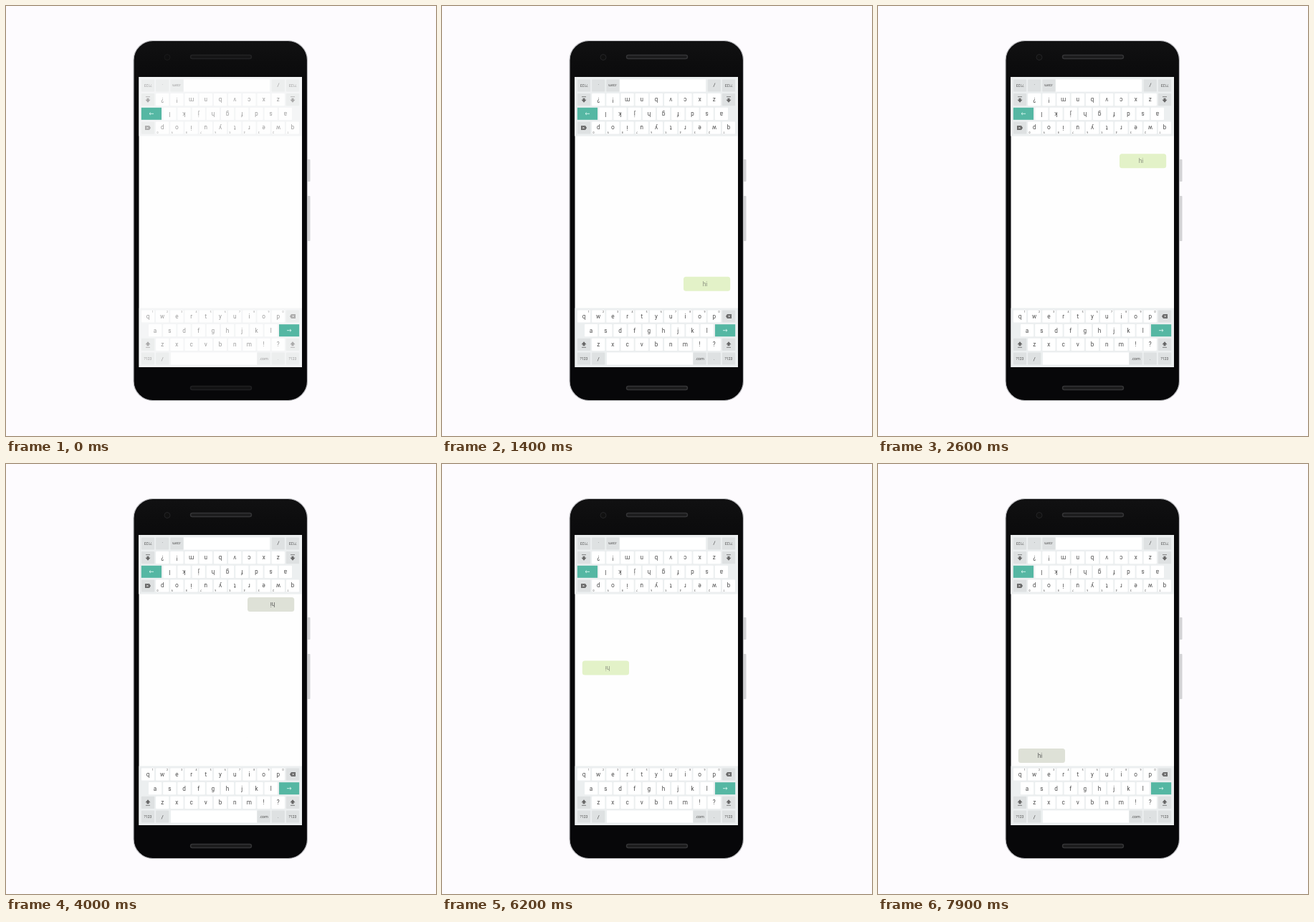
An HTML page for the animation above (8 s loop, 600 px wide and 600 px high).

```html
<!DOCTYPE html>
<html lang="en">
<head>
<meta charset="utf-8">
<style>
  html, body { margin: 0; width: 100%; height: 100%; overflow: hidden; background: #fdfbfe; }
  svg { display: block; width: 100%; height: 100%; }
  text { font-family: Roboto, "Open Sans", sans-serif; text-anchor: middle; fill: #4c4c4c; }
</style>
</head>
<body>
<svg id="stage" viewBox="0 0 600 600"></svg>
<script>
const LOOP = 8000, PITCH = 20.2, LEFT = 198;
const ROWS = [433, 452.7, 472.3, 492];
const col = i => LEFT + i * PITCH;

const rect = (x, y, w, h, fill, extra = '') =>
  `<rect x="${x}" y="${y}" width="${w}" height="${h}" fill="${fill}" ${extra}/>`;
const label = (s, x, y, size, extra = '') =>
  `<text x="${x}" y="${y}" font-size="${size}" ${extra}>${s}</text>`;
const key = (x, row, fill = '#fff', w = 18.2) =>
  rect(x - w / 2, ROWS[row] - 8.6, w, 17.2, fill, 'rx="1"');
const press = (name, x, row) =>
  `<g class="${name}" opacity="0">${key(x, row, '#a6a6a6')}</g>`;

function letters(chars, row, first) {
  return [...chars].map((c, i) => {
    const x = col(first + i);
    const digit = row ? '' : label((i + 1) % 10, x + 6.8, ROWS[0] - 4.6, 3.6);
    return key(x, row) + label(c, x, ROWS[row] + 2.8, 8.2) + digit;
  }).join('');
}

function modifier(i, row, content) {
  return key(col(i), row, '#dee1e2') +
    `<g transform="translate(${col(i)} ${ROWS[row]})">${content}</g>`;
}

function keyboard() {
  const shift = '<path d="M0-4L3.5 0H1.5V2H-1.5V0H-3.5Z" fill="#666"/>' +
    rect(-3, 3.6, 6, .9, '#777');
  const erase = '<path d="M-4 0L-2-3H4V3H-2Z" fill="#666"/>' +
    '<path d="M-.7-1.4L2 1.4M2-1.4L-.7 1.4" stroke="#eee" stroke-width=".8"/>';
  const symbols = label('?123', 0, 1.8, 5);
  return rect(185.5, 421.5, 227.5, 82.5, '#eceff0') +
    letters('qwertyuiop', 0, 0) + modifier(10, 0, erase) +
    letters('asdfghjkl', 1, .5) +
    modifier(0, 2, shift) + letters('zxcvbnm!?', 2, 1) + modifier(10, 2, shift) +
    modifier(0, 3, symbols) + modifier(1, 3, label('/', 0, 2.8, 8)) +
    rect(230, 483.4, 120, 17.2, '#fff') +
    modifier(8, 3, label('.com', 0, 2, 5.5)) + modifier(9, 3, label('.', 0, 2, 6)) +
    modifier(10, 3, symbols);
}

// One player's half; the other is the same half turned by 180 degrees.
function side(id, turn) {
  const word = (name, angle) =>
    `<g class="${name}" transform="rotate(${angle} 32.5 10)">${label('hi', 30, 13, 8.2)}</g>`;
  return `<g id="${id}" transform="rotate(${turn} 299 301.5)">
    <g class="intro">${keyboard()}</g>
    ${rect(381, 444.2, 28.2, 17, '#55b7a3', 'class="enter"')}
    <path d="M392 452.7H398M396.2 451L398 452.7L396.2 454.4" fill="none" stroke="#e9fffa" stroke-width=".8"/>
    ${press('h', col(5.5), 1)}${press('i', col(7), 0)}
    <g class="bubble">${rect(0, 0, 65.2, 20, '#e3f2c8', 'rx="3.5"')}
    ${word('sent', 0)}${word('got', 180)}</g>
  </g>`;
}

const grille = y =>
  rect(257.5, y, 85, 5, '#1b1b1c', 'rx="2.5" stroke="#343436" stroke-width="1.4" class="intro"');

stage.innerHTML = `
  <defs><linearGradient id="body" x2="0" y2="1">
    <stop stop-color="#111112"/><stop offset=".06" stop-color="#0d0d0e"/><stop offset=".2" stop-color="#070709"/>
  </linearGradient></defs>
  ${rect(419, 214, 5.5, 31, '#d3d3d5', 'rx="1"')}
  ${rect(419, 265, 5.5, 63, '#d3d3d5', 'rx="1"')}
  ${rect(178, 48.5, 242.5, 502, 'url(#body)', 'rx="27" stroke="#bcbcc0" stroke-width="1.2"')}
  <circle cx="225" cy="71.5" r="4" fill="#111" stroke="#252527" class="intro"/>
  ${grille(68.5)}${grille(530.5)}
  ${rect(185.5, 99, 227.5, 405, '#fefefe')}
  ${side('lower', 0)}${side('upper', 180)}`;

const ramp = (t, a, b) => Math.min(1, Math.max(0, (t - a) / (b - a)));
const mix = (a, b, k) => `rgb(${a.map((v, i) => Math.round(v + (b[i] - v) * k))})`;
const during = (t, a, b) => ramp(t, a - 50, a) * (1 - ramp(t, b, b + 100));

function animate(id, t) {
  const part = name => document.querySelector(`#${id} .${name}`);
  part('h').setAttribute('opacity', .78 * during(t, 600, 750));
  part('i').setAttribute('opacity', .74 * during(t, 700, 850));
  part('enter').setAttribute('fill', mix([85, 183, 163], [62, 142, 126], during(t, 900, 1000)));

  const p = (1 - Math.cos(Math.PI * ramp(t, 1000, 3000))) / 2;
  const landed = ramp(t, 2850, 3100);
  const bubble = part('bubble');
  bubble.setAttribute('transform', `translate(337 ${398 - 212 * p})`);
  bubble.setAttribute('opacity', ramp(t, 1000, 1200) * (1 - ramp(t, 4100, 4300)));
  bubble.firstChild.setAttribute('fill', mix([227, 242, 200], [222, 225, 215], landed));
  part('sent').setAttribute('opacity', .6 * (1 - landed));
  part('got').setAttribute('opacity', .9 * landed);
}

function frame(now) {
  const t = now % LOOP;
  const clarity = .55 + .45 * ramp(t, 50, 500);
  document.querySelectorAll('.intro').forEach(e => e.setAttribute('opacity', clarity));
  animate('lower', t);
  animate('upper', t - 4300);
  requestAnimationFrame(frame);
}
const start = performance.now();
const tick = () => frame(Math.max(0, performance.now() - start));
frame = (draw => () => draw(Math.max(0, performance.now() - start)))(frame);
tick();
</script>
</body>
</html>
```
